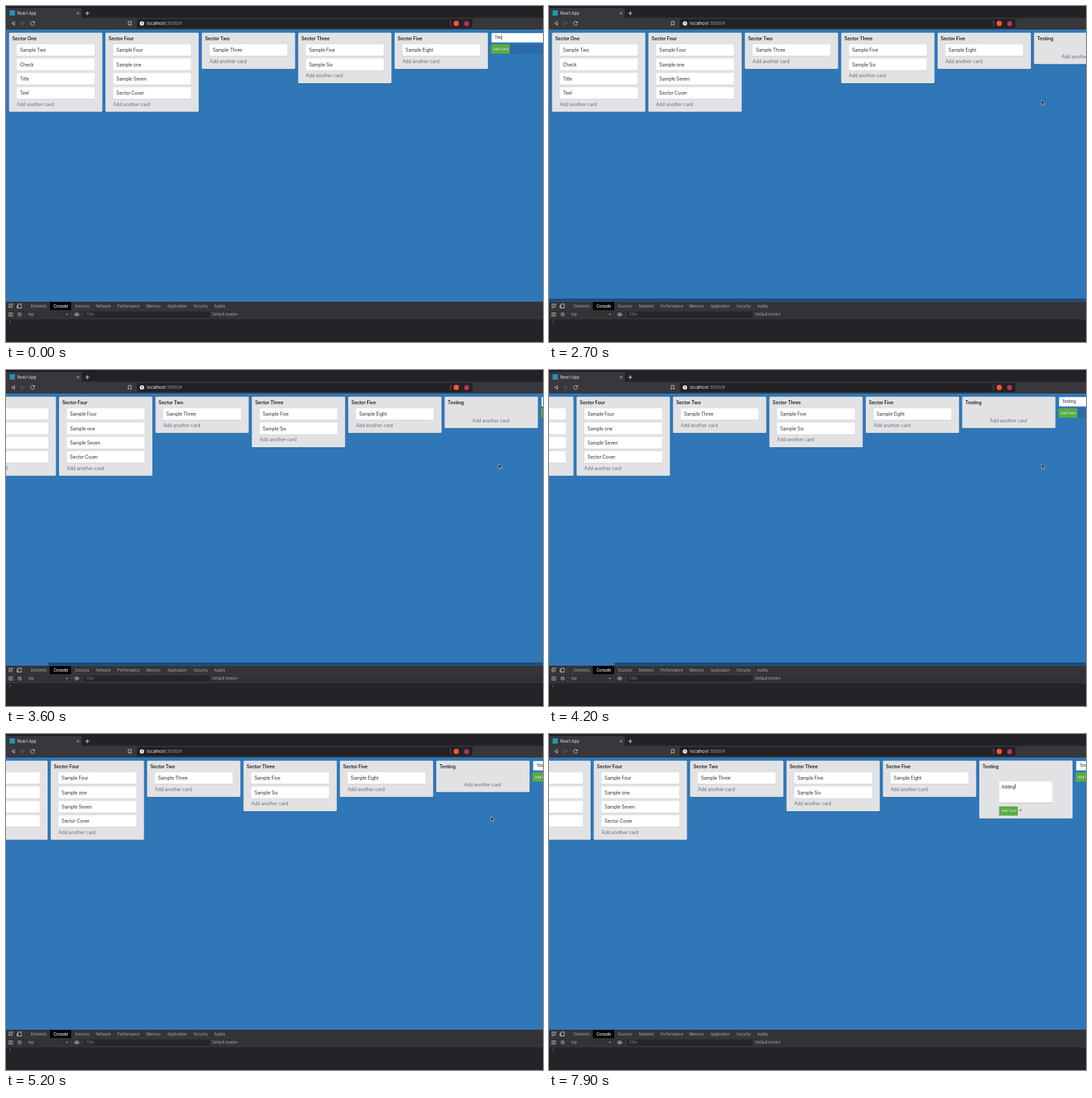
Write an HTML page that moves like this. It is 800 px wide and 500 px high and loops after 8 s.

```html
<!DOCTYPE html>
<html lang="en">
<head>
<meta charset="utf-8">
<title>Board</title>
<style>
  html, body { margin: 0; width: 100%; height: 100%; overflow: hidden; background: #242327; }
  svg { display: block; width: 800px; height: 500px; }
  text { font: 7px Inter, "Open Sans", sans-serif; letter-spacing: -.15px; fill: #303236; white-space: pre; }
  .title { font-weight: 600; fill: #202226; }
  .add { fill: #6a737f; }
  .field { font-size: 6px; letter-spacing: -.1px; fill: #222; }
  .hint { font-size: 6px; letter-spacing: -.1px; fill: #8b8b8b; }
  .button { font-size: 5px; letter-spacing: 0; fill: #e4f3df; }
  .tool { font-size: 5.7px; letter-spacing: -.1px; fill: #a6a7aa; }
  .on { fill: #fff; font-weight: 500; }
  .dim { fill: #77787c; }
  .tab { font-size: 6px; fill: #e2e2e4; letter-spacing: -.1px; }
  .url { font-size: 6.7px; fill: #eee; letter-spacing: -.12px; }
  .icon { fill: none; stroke: #c4c4c7; stroke-width: .9; }
</style>
</head>
<body>
<svg viewBox="0 0 800 500"></svg>
<script>
const PERIOD = 8000, STEP = 143.6, MAX_SCROLL = 81.5;

const rect = (x, y, w, h, fill, extra = '') =>
  `<rect x="${x}" y="${y}" width="${w}" height="${h}" fill="${fill}" ${extra}/>`;
const text = (x, y, s, cls = '', extra = '') =>
  `<text x="${x}" y="${y}" class="${cls}" ${extra}>${s}</text>`;
const dot = (x, y, r, fill) => `<circle cx="${x}" cy="${y}" r="${r}" fill="${fill}"/>`;
const icon = (d, extra = '') => `<path class="icon" d="${d}" ${extra}/>`;
const at = (x, y, body, id = '') => `<g id="${id}" transform="translate(${x} ${y})">${body}</g>`;

const panel = (h, extra = '') =>
  rect(0, .9, 139, h, '#1f5f98', 'rx="1.5"') + rect(0, 0, 139, h, '#e2e2e4', `rx="1.5" ${extra}`);

function list(title, cards, i) {
  const n = cards.length;
  return at(4.5 + i * STEP, 39.7, panel(32.8 + 21.25 * n) +
    text(4.7, 11.2, title, 'title') +
    cards.map((c, k) => {
      const y = 17.3 + k * 21.35;
      return rect(11.5, y + .6, 116, 17.3, '#c4c5c9', 'rx="1"') +
        rect(11.5, y, 116, 17.3, '#fff', 'rx="1"') + text(16.2, y + 11.2, c);
    }).join('') +
    text(11.5, 23.8 + n * 21.35, 'Add another card', 'add'));
}

const button = (x, y) => rect(x, y, 28, 13.8, '#5aac44', 'rx="1"') +
  text(x + 3.2, y + 8.7, 'Add Card', 'button') +
  icon(`M${x + 30} ${y + 5.5}h4m-2 -2v4`, 'style="stroke:#37506b;stroke-width:.6"');

const board = [
  ['Sector One', ['Sample Two', 'Check', 'Title', 'Teel']],
  ['Sector Four', ['Sample Four', 'Sample one', 'Sample Seven', 'Sector Cover']],
  ['Sector Two', ['Sample Three']],
  ['Sector Three', ['Sample Five', 'Sample Six']],
  ['Sector Five', ['Sample Eight']]
];

const newList = at(4.5 + 5 * STEP, 39.7,
  panel(46.8) +
  `<g id="opened">${panel(86)}
    ${rect(29.5, 31.5, 79.5, 32, '#b9babd', 'rx="1"')}${rect(29.5, 31, 79.5, 31.6, '#fff', 'rx="1"')}
    ${text(33.3, 41, '', 'field', 'id="note"')}${rect(0, 34.2, .6, 7.6, '#111', 'id="noteCaret"')}
    ${button(29.5, 68)}</g>` +
  text(4.7, 11.2, 'Testing', 'title') +
  text(41.3, 38, 'Add another card', 'add', 'id="addCard"'), 'newList');

const form = at(0, 0,
  rect(28, 17, 111, 14.5, '#2b6ca9') +
  rect(.8, .6, 138, 14, '#fff', 'rx="1"') +
  `<path id="focus" d="M-2 -.2H139" stroke="#1d538a" stroke-width=".8" stroke-dasharray="1 1"/>` +
  text(5.6, 9.8, '', 'field', 'id="name"') + rect(0, 3.5, .6, 7.6, '#111', 'id="nameCaret"') +
  button(0, 17.4), 'form');

const browser =
  rect(0, 0, 800, 18, '#222126') + rect(0, 3, 113, 16, '#38373b', 'rx="2"') + rect(0, 17.5, 800, 17.5, '#38373b') +
  rect(5.3, 6.3, 8, 8, '#2891b8') + text(16.7, 12.7, 'React App', 'tab') +
  icon('M105.7 9l3.5 3.5m0 -3.5l-3.5 3.5') + icon('M118.2 10.8h6m-3 -3v6', 'style="stroke:#eee"') +
  icon('M12.7 23.3v5.4l-4.3 -2.7z') + icon('M23 23.3v5.4l4.3 -2.7z', 'style="stroke:#66666b"') +
  icon('M42 24.2a2.9 2.9 0 1 0 .5 2.3M42.5 22.8v2.2h-2.3') +
  icon('M182.2 23h4.2v6l-2.1 -1.8l-2.1 1.8z') +
  rect(195, 19.3, 500, 13.6, '#222126', 'rx="2"') +
  dot(202.5, 26, 3.2, '#eee') + rect(202.1, 24, .9, 2.4, '#222126') + rect(202.1, 27.1, .9, .9, '#222126') +
  text(210, 28.4, 'localhost<tspan fill="#99999d">:3000/#</tspan>', 'url') +
  rect(661.8, 21.5, .7, 9, '#77777b') + dot(670.8, 26, 4, '#f0582f') + dot(686.2, 26.3, 3.7, '#b53a50');

const tabs = [['Elements', 37], ['Console', 71], ['Sources', 102.5], ['Network', 134], ['Performance', 166],
  ['Memory', 209], ['Application', 240.5], ['Security', 279], ['Audits', 310]];

const tools =
  rect(0, 440, 800, 60, '#242327') + rect(0, 440, 800, 12.6, '#343438') + rect(0, 453, 800, 12.5, '#323236') +
  rect(0, 452.5, 800, .6, '#47474b') + rect(0, 465.4, 800, .6, '#434347') +
  rect(65.3, 440.5, 31.7, 12, '#000') +
  tabs.map(([s, x]) => text(x, 448.5, s, s == 'Console' ? 'tool on' : 'tool')).join('') +
  icon('M7 449h-2.3v-5.3h5.3v2M7.2 446.2l3 3m-3 -1v-2h2') +
  icon('M18 443.5h4.8v6h-4.8zM18 445.5h-1.5v4h2') + rect(27.5, 443, .5, 7, '#4b4b4f') +
  icon('M4.3 456.5h5.6v5h-5.6zM6.3 457.7v2.6l2 -1.3z', 'style="stroke-width:.7"') +
  icon('M17.8 459a2.5 2.5 0 1 0 5 0a2.5 2.5 0 1 0 -5 0M18.6 457.2l3.5 3.5', 'style="stroke-width:.8"') +
  rect(28, 455.5, .5, 7, '#4b4b4f') + text(33.3, 460.9, 'top', 'tool') +
  '<path d="M89 458h3.4l-1.7 2.6zM342.2 457.7h3.4l-1.7 2.6z" fill="#929296"/>' +
  rect(97.5, 455.5, .5, 7, '#4b4b4f') +
  icon('M101.7 459q3.7 -4.6 7.4 0q-3.7 4.6 -7.4 0') + dot(105.4, 459, 1.2, '#c4c4c7') +
  rect(117, 454.7, 186, 8.8, '#252528') + text(119.5, 461.2, 'Filter', 'tool dim') +
  text(307, 460.8, 'Default levels', 'tool') +
  icon('M5 468.2l2 1.9l-2 1.9', 'style="stroke:#337ca8"');

const edge = 'stroke="#fff" stroke-width=".5" stroke-linejoin="round"';
const pointer =
  `<path id="arrow" d="M0 0v6.6l1.5 -1.3l1.1 2.4l1.2 -.5l-1.1 -2.4h2z" fill="#111" ${edge}/>` +
  `<path id="hand" d="M0 .2q.8 -.7 1.1 .2v2.6l3 .9q.8 .4 .5 1.6l-.6 2.5h-3.4l-2.1 -2.9q0 -1 1.2 -.4z"
    fill="#fff" stroke="#222" stroke-width=".55"/>` +
  `<path id="beam" d="M-1.2 -.5q1.2 0 1.2 1v6q0 1 -1.2 1M1.2 -.5q-1.2 0 -1.2 1v6q0 1 1.2 1"
    fill="none" stroke="#333" stroke-width=".6"/>`;

document.querySelector('svg').innerHTML =
  rect(0, 0, 800, 500, '#3077b8') +
  at(0, 0, board.map(([title, cards], i) => list(title, cards, i)).join('') + newList + form, 'lists') +
  rect(0, 435.6, 800, 3.8, '#1b4874', 'rx="1.9" id="bar"') +
  browser + tools + at(0, 0, pointer, 'pointer');

const el = {};
document.querySelectorAll('[id]').forEach(e => el[e.id] = e);
const move = (e, x, y) => e.setAttribute('transform', `translate(${x} ${y})`);
const show = (e, on) => e.style.display = on ? '' : 'none';

// Linear interpolation over [time, ...values] keys
function track(keys, t) {
  const k = keys.findIndex(key => key[0] > t);
  if (k < 0) return keys[keys.length - 1].slice(1);
  if (k == 0) return keys[0].slice(1);
  const a = keys[k - 1], b = keys[k], p = (t - a[0]) / (b[0] - a[0]);
  return a.slice(1).map((v, i) => v + (b[i + 1] - v) * p);
}

const scrollKeys = [[2750, 0], [2900, 4], [3200, 29.5], [3600, 69], [3800, 84], [4000, 98], [4200, 107],
  [4400, 104], [4600, 94], [4800, 86], [5000, MAX_SCROLL]];
const pointerKeys = [[800, 797, 66], [1050, 760, 64], [1300, 738, 61], [1900, 738, 61], [2200, 736, 104],
  [2600, 733.8, 140], [4300, 733.8, 140], [5000, 725, 127], [5200, 722.5, 123], [5700, 711, 73], [6300, 711, 75]];
const typed = (word, from, times, t) => word.slice(0, from + times.filter(s => t >= s).length);

function type(label, caret, s, x, on) {
  if (label.textContent != s) label.textContent = s;
  show(caret, on);
  caret.setAttribute('x', x + label.getComputedTextLength() + .2);
}

function draw() {
  const t = performance.now() % PERIOD;
  const scroll = track(scrollKeys, t)[0];
  const added = t >= 1900, opened = t >= 6000, writing = t >= 7200;

  move(el.lists, -scroll, 0);
  show(el.newList, added);
  move(el.form, 4.5 + (added ? 6 : 5) * STEP, 39.7);
  show(el.focus, !added);
  type(el.name, el.nameCaret, typed('Testing', 3, [100, 200, 400, 600], t), 5.6, t < 800);

  show(el.opened, opened);
  show(el.addCard, !opened);
  el.note.setAttribute('class', writing ? 'field' : 'hint');
  if (writing) type(el.note, el.noteCaret, typed('Adding', 1, [7700, 7700, 7800, 7800, 7900], t), 33.3, true);
  else {
    type(el.note, el.noteCaret, 'Enter a title for this card', 33.3, true);
    el.noteCaret.setAttribute('x', 33.1);
  }

  const start = scroll * 800 / (800 + MAX_SCROLL);
  el.bar.setAttribute('x', start);
  el.bar.setAttribute('width', 800 - start);
  el.bar.style.opacity = t < 2700 ? 0 : Math.max(0, Math.min(1, (5200 - t) / 200));

  move(el.pointer, ...track(pointerKeys, t));
  show(el.pointer, t >= 800 && !writing);
  const hand = t >= 1150 && t < 2000 || t >= 5650 && t < 6000;
  show(el.hand, hand);
  show(el.beam, opened);
  show(el.arrow, !hand && !opened);
  requestAnimationFrame(draw);
}
draw();
</script>
</body>
</html>
```
